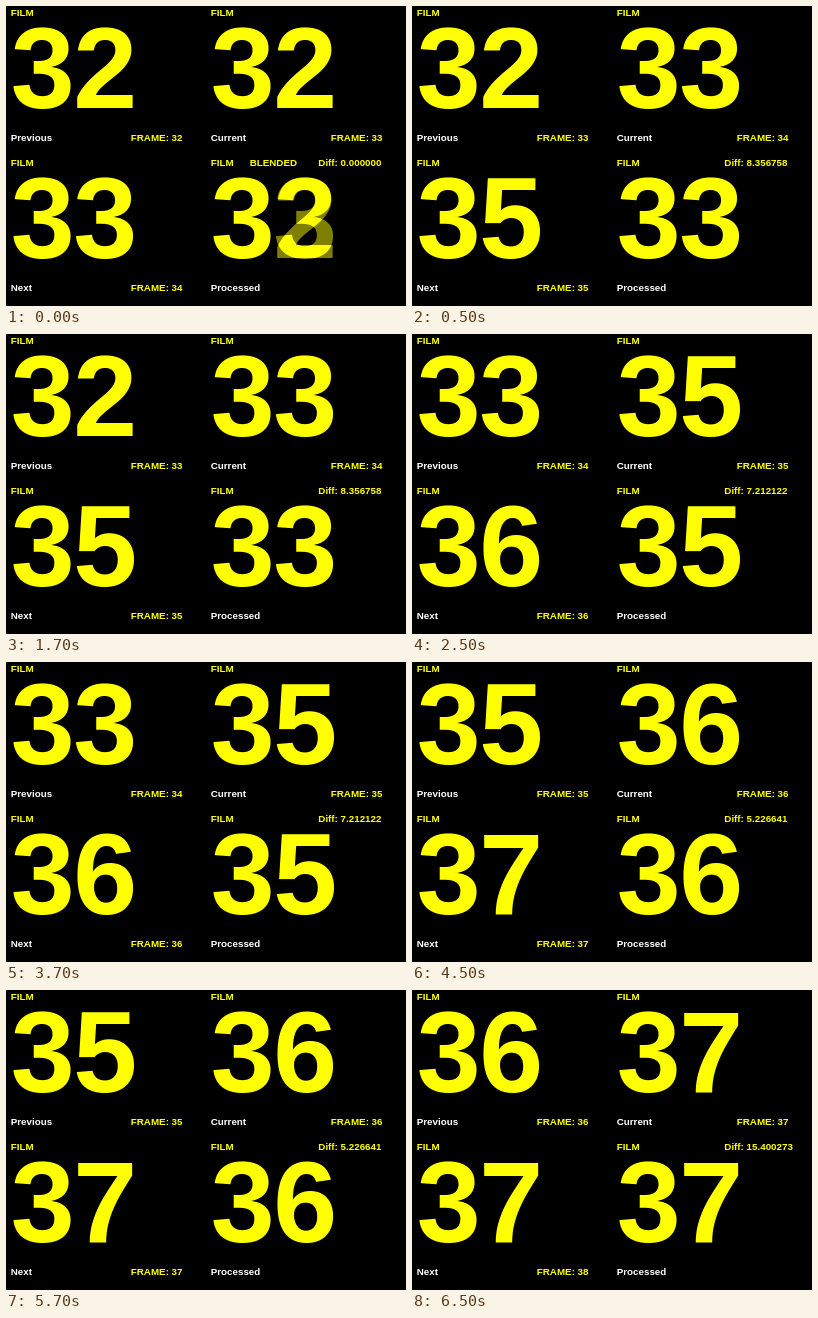
Animation, 400 px wide and 300 px high, one loop 8000 ms. Source, as an HTML page with a canvas:

```html
<!DOCTYPE html>
<html lang="en">
<head>
<meta charset="utf-8">
<title>Frame blending</title>
<style>
html, body { margin: 0; height: 100%; overflow: hidden; background: #000; }
canvas { display: block; }
</style>
</head>
<body>
<canvas id="stage" width="400" height="300"></canvas>
<script>
const ctx = document.getElementById('stage').getContext('2d');
const LOOP = 8000;
const YELLOW = '#ff0';
const HALF = '#808000';
const LEFT = 4.7;
const FIRST = 32;
const shown = [32, 32, 33, 35, 36, 37, 37]; // number pictured in each film frame
const diffs = ['0.000000', '8.356758', '7.212122', '5.226641', '15.400273'];

function text(str, x, y, color = YELLOW, size = 9.8, spacing = 0) {
  ctx.font = `bold ${size}px "Liberation Sans", Arial, sans-serif`;
  ctx.letterSpacing = spacing + 'px';
  ctx.fillStyle = color;
  ctx.fillText(str, x, y);
}

function big(x, y, number, color) {
  text(number, x + LEFT, y + 102.3, color, 115, -1.4);
}

function panel(x, y, label, number, color) {
  text('FILM', x + LEFT, y + 10);
  text(label, x + LEFT, y + 135, '#fff');
  big(x, y, number, color);
}

function filmPanel(x, y, label, index) {
  panel(x, y, label, shown[index]);
  text('FRAME: ' + (FIRST + index), x + 124.8, y + 135);
}

function draw(step) {
  ctx.globalCompositeOperation = 'source-over';
  ctx.fillStyle = '#000';
  ctx.fillRect(0, 0, 400, 300);

  filmPanel(0, 0, 'Previous', step);
  filmPanel(200, 0, 'Current', step + 1);
  filmPanel(0, 150, 'Next', step + 2);

  const blended = step === 0;
  text('Diff: ' + diffs[step], 312.3, 160);
  if (blended) {
    text('BLENDED', 243.7, 160);
    ctx.globalCompositeOperation = 'lighter';
    big(200, 150, shown[step + 2], HALF);
  }
  panel(200, 150, 'Processed', shown[step + 1], blended ? HALF : YELLOW);
}

let last = -1;

function tick() {
  const t = performance.now() % LOOP;
  const step = Math.floor((t + 1500) / 2000);
  if (step !== last) draw(last = step);
  requestAnimationFrame(tick);
}
tick();
</script>
</body>
</html>
```
